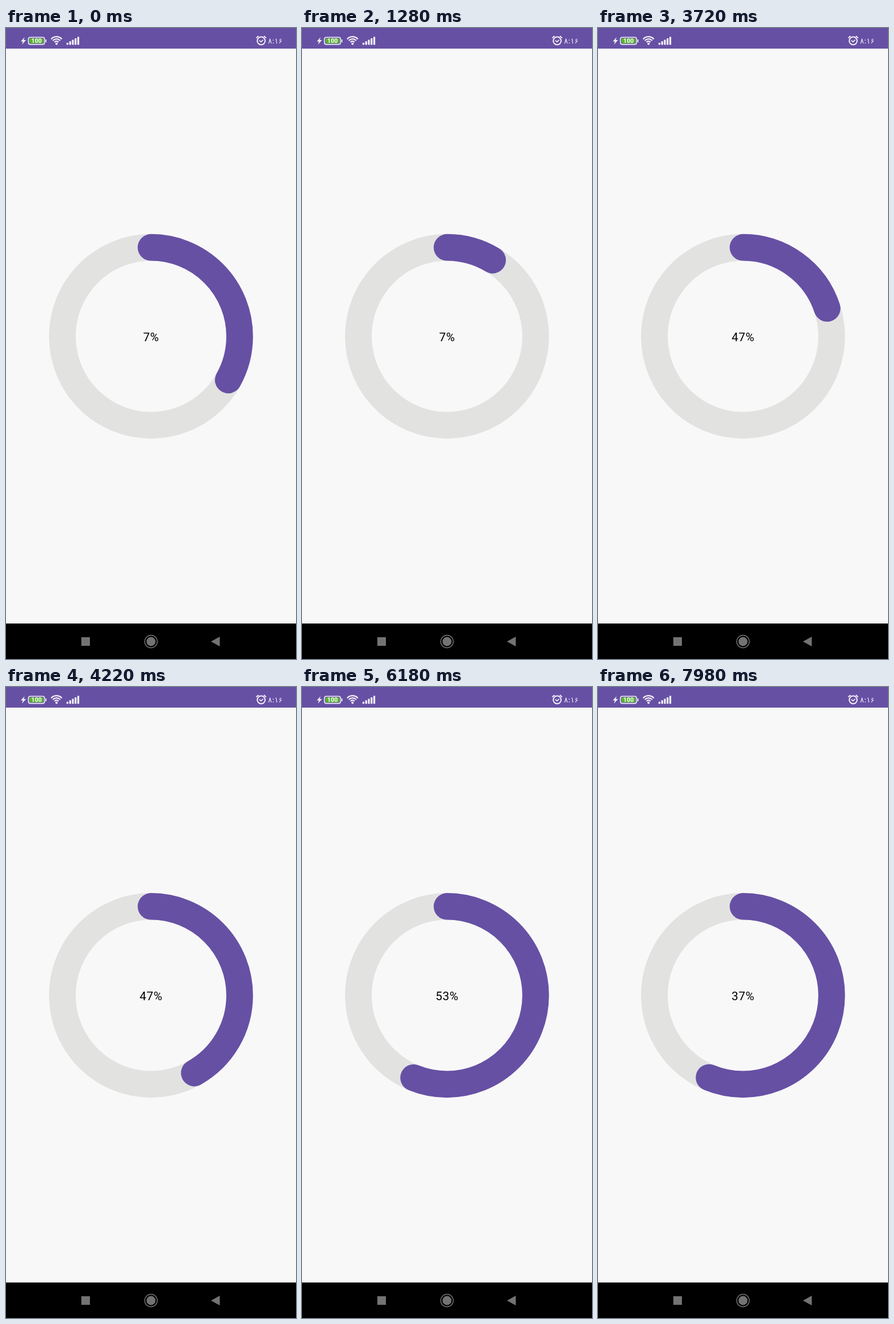
Recreate the animation shown at these times as an HTML page with a canvas. Size 508x1102 px, loop 8 s.

```html
<!DOCTYPE html>
<html lang="en">
<head>
<meta charset="utf-8">
<title>Progress ring</title>
<style>
  html, body { margin: 0; width: 100%; height: 100%; overflow: hidden; background: #f8f8f9; }
  canvas { display: block; }
</style>
</head>
<body>
<canvas id="stage" width="508" height="1102"></canvas>
<script>
const ctx = document.getElementById('stage').getContext('2d');
const LOOP = 8000, TAU = 2 * Math.PI;
const PURPLE = '#6650a4', PAPER = '#f8f8f9', TRACK = '#e2e2e1', GREY = '#737373', INK = '#f3f0fa';
const RING = { x: 254, y: 538.5, r: 155.3, width: 46.7 };

// Motion is counted in steps; it rests between the two runs.
const FIRST_RUN = 40, REST_AT = 46, SECOND_RUN = 2580;
const DEGREES = 3.87, STIFFNESS = 0.15, LAG = 2.5;
const START = { offset: 92.3, drift: 10.05 };

// Values picked by the user: [step, percent]
const TARGETS = [[0, 7], [47, 9], [67, 47], [95, 49], [126, 56], [137, 53], [143, 55], [178, 37]];

// Five of every 21 steps linger
const hold = i => (5 * i + 2) % 21 < 5 ? 100 : 20;

function stepsSince(start, t) {
  let n = 0;
  for (let at = start; at <= t; n++) at += hold(n);
  return n;
}

const stepAt = t => Math.min(REST_AT, stepsSince(FIRST_RUN, t)) + stepsSince(SECOND_RUN, t);

const percentAt = n => TARGETS.filter(([step]) => step <= n).pop()[1];

// Critically damped spring: the start decays while each new target adds its own response
function sweepAt(n) {
  let sweep = TARGETS[0][1] * DEGREES + (START.offset + START.drift * n) * Math.exp(-STIFFNESS * n);
  for (let i = 1; i < TARGETS.length; i++) {
    const x = STIFFNESS * Math.max(0, n - LAG - TARGETS[i][0]);
    sweep += (TARGETS[i][1] - TARGETS[i - 1][1]) * DEGREES * (1 - (1 + x) * Math.exp(-x));
  }
  return sweep;
}

function rect(x, y, w, h, color) {
  ctx.fillStyle = color;
  ctx.fillRect(x, y, w, h);
}

function trace(points) {
  ctx.beginPath();
  points.forEach(([x, y]) => ctx.lineTo(x, y));
}

function poly(points, color) {
  ctx.fillStyle = color;
  trace(points);
  ctx.fill();
}

function line(points, width, color) {
  ctx.strokeStyle = color;
  ctx.lineWidth = width;
  trace(points);
  ctx.stroke();
}

function arc(x, y, r, from, to, width, color) {
  ctx.strokeStyle = color;
  ctx.lineWidth = width;
  ctx.beginPath();
  ctx.arc(x, y, r, from, to);
  ctx.stroke();
}

function disc(x, y, r, color) {
  ctx.fillStyle = color;
  ctx.beginPath();
  ctx.arc(x, y, r, 0, TAU);
  ctx.fill();
}

function roundBox(x, y, w, h, r) {
  ctx.beginPath();
  ctx.roundRect(x, y, w, h, r);
}

function text(str, x, y, font, color, align, spacing = '0px') {
  ctx.font = font;
  ctx.fillStyle = color;
  ctx.textAlign = align;
  ctx.letterSpacing = spacing;
  ctx.fillText(str, x, y);
}

function battery() {
  poly([[32.5, 16], [26, 23.5], [29.7, 23.5], [28, 29], [35, 21], [31, 21]], INK);
  ctx.strokeStyle = INK;
  ctx.lineWidth = 1.6;
  roundBox(39.3, 16.2, 28.2, 12.4, 3.2);
  ctx.stroke();
  ctx.fillStyle = '#58b52f';
  roundBox(41.2, 18.1, 24.4, 8.6, 1.5);
  ctx.fill();
  rect(69, 20, 1.7, 5, INK);
  text('100', 53.4, 26.2, 'bold 10.5px Roboto, sans-serif', '#fff', 'center');
}

function wifi() {
  const up = -Math.PI / 2;
  for (const r of [4.8, 8.8, 12.8]) arc(88.5, 28, r, up - 0.83, up + 0.83, 2.3, INK);
  disc(88.5, 27.6, 2, INK);
}

function signal() {
  for (let i = 0; i < 5; i++) {
    const h = 3.5 + 2.6 * i;
    rect(106 + 4.75 * i, 29.3 - h, 3.2, h, INK);
  }
}

function alarm() {
  arc(447, 22.4, 6.8, 0, TAU, 2, INK);
  line([[438.4, 17.4], [442.4, 14]], 2, INK);
  line([[455.6, 17.4], [451.6, 14]], 2, INK);
  line([[443.8, 21.6], [446.6, 24.4], [450.4, 20.8]], 1.6, INK);
}

function statusBar() {
  rect(0, 0, 508, 36, PURPLE);
  battery();
  wifi();
  signal();
  alarm();
  text('۸:۱۶', 459, 27, '13px "DejaVu Sans", sans-serif', INK, 'left');
}

function navBar() {
  rect(0, 1040, 508, 62, '#000');
  rect(132, 1064, 15, 15, GREY);
  arc(254, 1071.5, 11, 0, TAU, 1.4, GREY);
  disc(254, 1071.5, 7.9, GREY);
  poly([[359, 1071.5], [374.5, 1063], [374.5, 1080]], GREY);
}

function ring(sweep) {
  const { x, y, r, width } = RING, top = -Math.PI / 2;
  arc(x, y, r, 0, TAU, width, TRACK);
  ctx.lineCap = 'round';
  arc(x, y, r, top, top + sweep * TAU / 360, width, PURPLE);
  ctx.lineCap = 'butt';
}

function draw(t) {
  const n = stepAt(t);
  rect(0, 0, 508, 1102, PAPER);
  statusBar();
  ring(sweepAt(n));
  text(percentAt(n) + '%', 254.2, 547, '20.7px Roboto, sans-serif', '#000', 'center', '0.65px');
  navBar();
}

const origin = performance.now();
function tick() {
  draw((performance.now() - origin + 0.01) % LOOP);
  requestAnimationFrame(tick);
}
tick();
</script>
</body>
</html>
```
